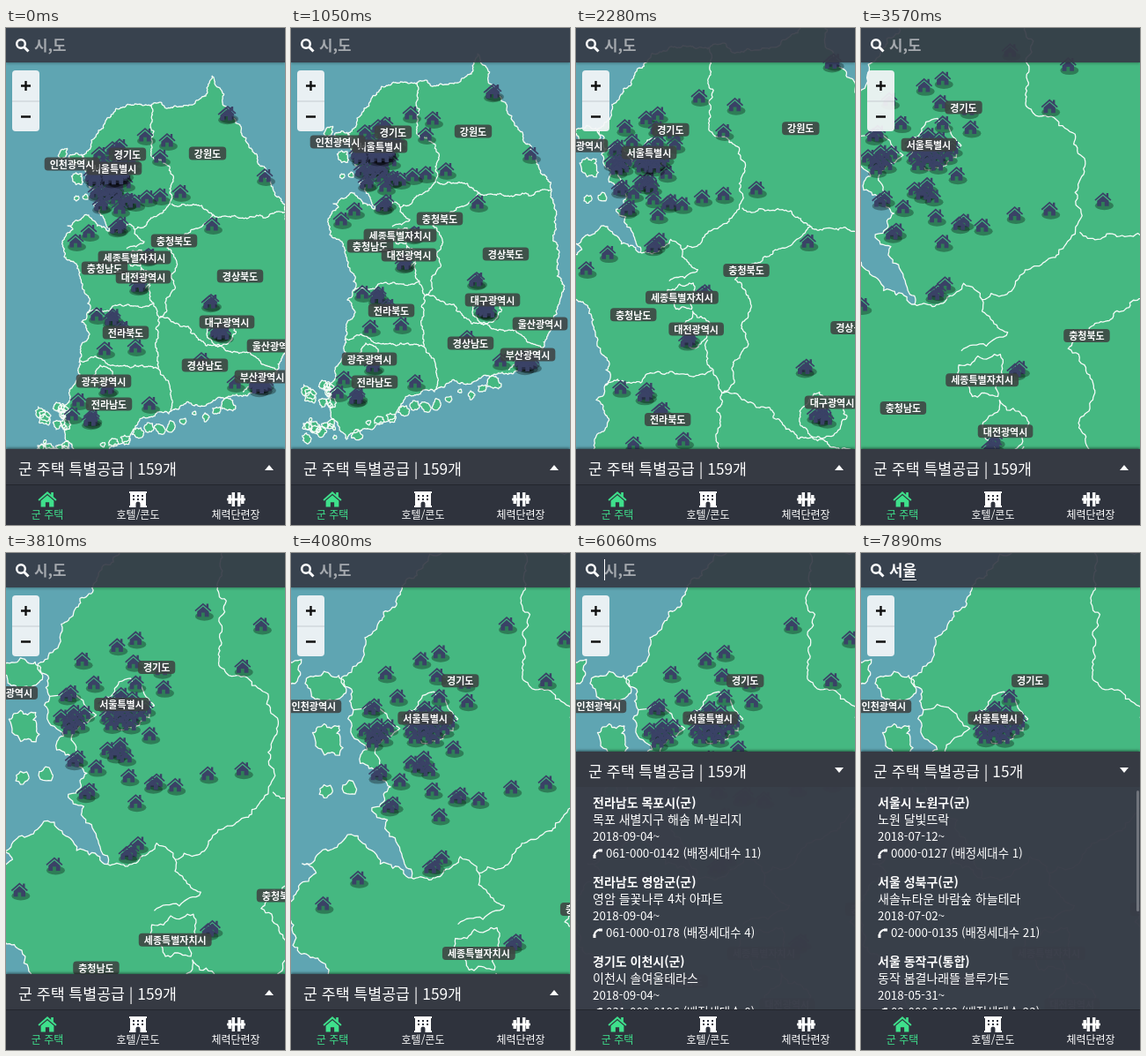
Write an HTML page with a canvas that moves like this. It is 317 by 563 pixels and loops after 8000 ms.

```html
<!DOCTYPE html>
<html lang="ko">
<head>
<meta charset="utf-8">
<style>
  html, body { margin: 0; width: 100%; height: 100%; overflow: hidden; background: #5fa5b2; }
  body { font-family: "Noto Sans CJK KR", "Noto Sans CJK", "Noto Sans", sans-serif; color: #fff; }
  #stage { position: relative; width: 317px; height: 563px; overflow: hidden; }
  #stage > * { position: absolute; }
  #search { left: 0; top: 0; width: 317px; height: 39px; background: rgba(54, 58, 70, .92); box-shadow: 0 1px 3px rgba(0, 0, 0, .3); }
  #search svg { position: absolute; left: 10px; top: 11px; }
  #query { position: absolute; left: 32px; top: 7px; height: 24px; font-weight: 600; font-size: 16.8px; line-height: 25px; white-space: pre; }
  #query i { color: #a5a9ae; font-style: normal; }
  #query u { text-decoration: none; display: inline-block; height: 23px; border-bottom: 1px solid #fff; }
  #caret { position: absolute; top: 7px; width: 1px; height: 24px; background: #fff; }
  #zoom { left: 7px; top: 48px; width: 31px; height: 69px; border-radius: 4px; background: rgba(246, 247, 249, .92); }
  #panel { left: 0; width: 317px; height: 292px; background: rgba(57, 61, 72, .98); box-shadow: 0 -1px 3px rgba(0, 0, 0, .55); }
  #title { height: 40px; background: #363a43; font-size: 17.3px; line-height: 43px; padding-left: 14px; white-space: pre; }
  #arrow { position: absolute; left: 294px; top: 18px; }
  #list { font-size: 13.4px; line-height: 19px; padding: 8px 19px; white-space: nowrap; }
  #list div { height: 90px; }
  #list b, #list span { font-size: 14px; }
  #list svg { margin-right: 4px; vertical-align: -1px; }
  #thumb { position: absolute; left: 313px; top: 44px; width: 3px; border-radius: 2px; background: #70747c; }
  #tabs { left: 0; top: 517px; width: 317px; height: 46px; background: #2f333d; border-top: 1px solid #23262d; box-sizing: border-box; }
  #tabs div { position: absolute; top: 6px; width: 90px; text-align: center; font-size: 12px; font-weight: 500; line-height: 16px; }
  #tabs svg { display: block; margin: 0 auto; }
</style>
</head>
<body>
<div id="stage">
  <canvas id="map" width="317" height="563"></canvas>
  <div id="zoom"><svg width="31" height="69" stroke="#111" stroke-width="2.4">
    <path d="M10 17.5h11M15.5 12v11M10 52.5h11"/><path d="M0 35h31" stroke="#c5cbd0" stroke-width="1"/></svg></div>
  <div id="search">
    <svg width="18" height="18" fill="none" stroke="#fff"><circle cx="7" cy="7" r="4.8" stroke-width="2.5"/><path d="M10.5 10.5l5 5" stroke-width="3"/></svg>
    <div id="query"></div><div id="caret"></div>
  </div>
  <div id="panel">
    <div id="title"></div>
    <svg id="arrow" width="10" height="6" fill="#fff"><path d="M0 6L5 0l5 6z"/></svg>
    <div id="list"></div><div id="thumb"></div>
  </div>
  <div id="tabs">
    <div style="left:2px;color:#3fe08c"><svg width="24" height="19" viewBox="-10.5 -9.5 21 18"><path id="home" fill="#3fe08c"/></svg>군 주택</div>
    <div style="left:105px"><svg width="20" height="19"><path fill="#fff" fill-rule="evenodd" d="M0 1h20v2h-1v14h1v2H12.5v-4a2.5 2.5 0 0 0-5 0v4H0v-2h1V3H0zM4 5v2h2V5zm5 0v2h2V5zm5 0v2h2V5zM4 9v2h2V9zm5 0v2h2V9zm5 0v2h2V9z"/></svg>호텔/콘도</div>
    <div style="left:216px"><svg width="21" height="19" stroke="#fff"><path stroke-width="3.4" d="M3.2 5v10M7.3 2v16M13.7 2v16M17.8 5v10"/><path stroke-width="2.6" d="M0 10h21"/></svg>체력단련장</div>
  </div>
</div>
<script>
const LOOP = 8000, ZOOM = 2.64;
const $ = id => document.getElementById(id);
const ctx = $('map').getContext('2d');
const HOUSE = 'M0-8.5L4-5V-7.5H6.5V-2.8L10 .3 8.9 1.7 0-6-8.9 1.7-10 .3zM0-4.5L7 1.5V8H2V3H-2V8H-7V1.5z';
const house = new Path2D(HOUSE);
$('home').setAttribute('d', HOUSE);

const pts = s => s.trim().split(/\s+/).map(p => p.split(',').map(Number));
let seed = 7;
const rand = () => (seed = (seed * 16807) % 2147483647) / 2147483647 - .5;

// Midpoint displacement turns a few key points into a ragged line.
function ragged(line, amp) {
  const out = [line[0]];
  const split = ([x, y], [u, v]) => {
    const len = Math.hypot(u - x, v - y);
    if (len < 1.7) return out.push([u, v]);
    const k = rand() * amp * Math.min(1, 12 / len);
    const mid = [(x + u) / 2 - (v - y) * k, (y + v) / 2 + (u - x) * k];
    split([x, y], mid);
    split(mid, [u, v]);
  };
  line.slice(1).forEach((p, i) => split(line[i], p));
  return out;
}
const ring = p => ragged([...p, p[0]], .5);
function blob(x, y, r) {
  const p = [];
  for (let a = 0; a < 6; a += .9) {
    const d = r * (1 + rand() * .6);
    p.push([x + d * Math.cos(a), y + d * Math.sin(a)]);
  }
  return ring(p);
}

const coast = {
  east: '212,29 228,64 245,92 264,125 281,155 296,183 300,215 302,250 308,290 301,335 286,364 265,387',
  south: '240,390 222,394 200,403 183,399 163,412 148,412 130,418 118,440 102,446 86,454 63,466 46,442 43,415',
  west: '50,385 60,362 63,338 73,322 64,308 74,292 67,272 62,252 58,242 44,234 42,217 54,203 48,199 63,192',
  bay: '72,187 79,194 87,201 95,205 92,199 88,188 78,175 86,166 73,156 76,150 69,141 70,133',
  north: '65,119 72,113 75,102 83,91 91,81 100,71 118,62 145,61 170,63 190,62 205,52'
};
const land = [ring(pts(Object.values(coast).join(' '))), blob(59, 124, 8), blob(43, 117, 6), blob(59, 146, 7),
  blob(58, 168, 3), blob(69, 167, 3)];
for (let i = 0; i < 26; i++) land.push(blob(32 + rand() * 38, 434 + rand() * 62, 4 + rand() * 5));
for (let x = 75; x < 240; x += 13) land.push(blob(x, 482 - x * .34 + rand() * 16, 4.5 + rand() * 5));

const borders = [
  '142,62 146,92 144,110 146,123 164,132 168,148 164,157 167,167 162,177 152,186 124,203 116,196 109,202 95,205',
  '124,203 135,217 115,225',
  '70,133 82,133 90,141 80,148 82,157',
  '166,174 182,176 200,176 214,187 240,189 270,190 296,183',
  '214,187 196,202 172,214 161,224 172,240 166,254 170,268 160,290 152,303',
  '142,266 145,286 152,303',
  '70,298 95,296 102,289 122,290 145,287',
  '61,352 80,347 100,357 125,357 152,362',
  '152,303 149,330 152,362 164,380 163,410',
  '152,303 185,313 206,335 240,342 262,338 301,335',
  '254,342 270,356 286,364',
  '247,387 262,367 286,364'
].map(s => ragged(pts(s), .45));
borders.push(blob(102, 137, 12), blob(124, 236, 10), blob(134, 258, 11), blob(224, 320, 14), blob(88, 371, 12));

// Homes: x, y and how many stand there, packed in a spiral.
const spiral = ([x, y, n = 1]) => Array.from({ length: n }, (_, i) => {
  const r = 2.6 * Math.sqrt(i);
  return [x + r * Math.cos(i * 2.4), y + r * .7 * Math.sin(i * 2.4)];
});
const homesAt = s => pts(s).flatMap(spiral).sort((a, b) => a[1] - b[1]);
const seoul = homesAt('102,139,16 107,127');
const capitalArea = homesAt(`136,96 161,102 153,120 107,108 99,111 84,117 89,127 106,118 118,121 119,129 113,149 79,131,2
  80,142,7 100,156,5 82,159,2 90,163 104,167 116,169,2 124,171 138,166 153,164 176,160 87,173,2 107,178`);
const provinces = homesAt(`230,71,2 272,142 212,197 108,196 105,199,2 72,205 57,216 140,232,2 129,265,3 211,284,2 200,350
  81,299 99,303,3 110,314,2 90,338 125,335 94,381,2 141,400 60,396 53,412 75,417,3 222,318,5 238,376 266,377,9`);
const allHomes = [...capitalArea, ...seoul, ...provinces];

const labels = [
  ['경기도', 116, 118], ['강원도', 207, 117], ['서울특별시', 101, 134], ['인천광역시', 53, 129], ['충청북도', 169, 216],
  ['세종특별자치시', 124, 235], ['충청남도', 90, 247], ['대전광역시', 134, 257], ['경상북도', 244, 256],
  ['대구광역시', 229, 308], ['전라북도', 114, 320], ['울산광역시', 283, 335], ['경상남도', 204, 357],
  ['부산광역시', 269, 370], ['광주광역시', 89, 375], ['전라남도', 95, 401]
];

const allRows = [
  ['전라남도 목포시(군)', '목포 새별지구 해솜 M-빌리지', '2018-09-04~', '061-000-0142', 11],
  ['전라남도 영암군(군)', '영암 들꽃나루 4차 아파트', '2018-09-04~', '061-000-0178', 4],
  ['경기도 이천시(군)', '이천시 솔여울테라스', '2018-09-04~', '031-000-0196', 8]
];
const seoulRows = [
  ['서울시 노원구(군)', '노원 달빛뜨락', '2018-07-12~', '0000-0127', 1],
  ['서울 성북구(군)', '새솔뉴타운 바람숲 하늘테라', '2018-07-02~', '02-000-0135', 21],
  ['서울 동작구(통합)', '동작 봄결나래뜰 블루가든', '2018-05-31~', '02-000-0182', 23]
];

const all = { homes: allHomes, rows: allRows, count: 159, bar: 45 };
const none = { homes: [], rows: [], count: 0, bar: 0 };
const found = { homes: seoul, rows: seoulRows, count: 15, bar: 137 };
const states = [
  { from: 0, done: '', typing: '', ...all },
  { from: 6540, done: '', typing: 'ㅅ', ...none },
  { from: 7020, done: '', typing: '서', ...found, count: 23, bar: 90 },
  { from: 7260, done: '서', typing: '우', ...none },
  { from: 7410, done: '서', typing: '울', ...found }
];

const smooth = u => u * u * (3 - 2 * u);
const part = (t, a, b) => Math.min(1, Math.max(0, (t - a) / (b - a)));
const mix = (a, b, u) => a + (b - a) * u;

const drag = [[840, 22, 25], [1050, 0, 0], [1650, -12, 11], [1800, -14, 13]];
const FAR = drag[3].slice(1), NEAR = [-190, -228.4];

// Returns scale and offset of the map.
function view(t) {
  if (t < 2280) {
    let [, x, y] = drag[0];
    for (let i = 1; i < drag.length; i++) {
      const u = smooth(part(t, drag[i - 1][0], drag[i][0]));
      x = mix(x, drag[i][1], u);
      y = mix(y, drag[i][2], u);
    }
    return [1, x, y];
  }
  const s = t < 3090 ? Math.sqrt(ZOOM) : ZOOM, u = (s - 1) / (ZOOM - 1);
  const e = 1 - (1 - part(t, 3570, 4080)) ** 2;
  return [s, mix(FAR[0], NEAR[0], u) + 76 * e, mix(FAR[1], NEAR[1], u) + 55 * e];
}

function drawMap([s, dx, dy], homes) {
  const at = ([x, y]) => [x * s + dx, y * s + dy];
  const trace = line => line.forEach((p, i) => ctx[i ? 'lineTo' : 'moveTo'](...at(p)));
  ctx.fillStyle = '#5fa5b2';
  ctx.fillRect(0, 0, 317, 563);
  ctx.strokeStyle = '#f4fbf7';
  ctx.lineWidth = 1.3;
  ctx.lineJoin = 'round';
  ctx.fillStyle = '#45b881';
  ctx.beginPath();
  land.forEach(trace);
  ctx.fill();
  borders.forEach(trace);
  ctx.stroke();

  for (const p of homes) {
    const [x, y] = at(p);
    ctx.fillStyle = 'rgba(0,0,0,.32)';
    ctx.beginPath();
    ctx.ellipse(x + 1.5, y + 7, 10.5, 5, 0, 0, 7);
    ctx.fill();
    ctx.save();
    ctx.translate(x, y);
    ctx.scale(.95, .95);
    ctx.fillStyle = '#3a4266';
    ctx.fill(house);
    ctx.restore();
  }

  ctx.font = '600 11px "Noto Sans CJK KR", "Noto Sans CJK", sans-serif';
  ctx.textAlign = 'center';
  ctx.textBaseline = 'middle';
  for (const [text, gx, gy] of labels) {
    const [x, y] = at([gx, gy + 4]), w = ctx.measureText(text).width + 12;
    ctx.fillStyle = 'rgba(62,66,66,.86)';
    ctx.beginPath();
    ctx.roundRect(x - w / 2, y - 11.5, w, 15, 4);
    ctx.fill();
    ctx.fillStyle = '#fff';
    ctx.fillText(text, x, y - 3.5);
  }
}

const phone = '<svg width="11" height="11" fill="none" stroke="#fff"><path d="M2 10C1 5 5 1 10 2" stroke-width="2"/><path d="M2 7v4M7 2h4" stroke-width="3"/></svg>';
const row = ([place, name, date, tel, n]) =>
  `<div><b>${place}</b><br><span>${name}</span><br>${date}<br>${phone}${tel} (배정세대수 ${n})</div>`;

let shown;
function showState(state) {
  if (shown === state) return;
  shown = state;
  const { done, typing, rows, count, bar } = state;
  $('query').innerHTML = typing ? `${done}<u>${typing}</u>` : '<i>시,도</i>';
  $('caret').style.left = 32 + 16 * (done + typing).length + 'px';
  $('title').textContent = `군 주택 특별공급 | ${count}개`;
  $('list').innerHTML = rows.map(row).join('');
  $('thumb').style.height = bar + 'px';
}

function frame(now) {
  const t = now % LOOP;
  const state = states.filter(s => t >= s.from).pop();
  showState(state);
  drawMap(view(t), state.homes);
  $('panel').style.top = 477 - 252 * smooth(part(t, 4830, 5280)) + 'px';
  $('arrow').style.transform = t < 4830 ? '' : 'scaleY(-1)';
  $('caret').hidden = t < 6060 || t >= 7890;
  $('thumb').hidden = t < 4830 || (t >= 5820 && t < 6540);
  requestAnimationFrame(frame);
}
requestAnimationFrame(frame);
</script>
</body>
</html>
```
